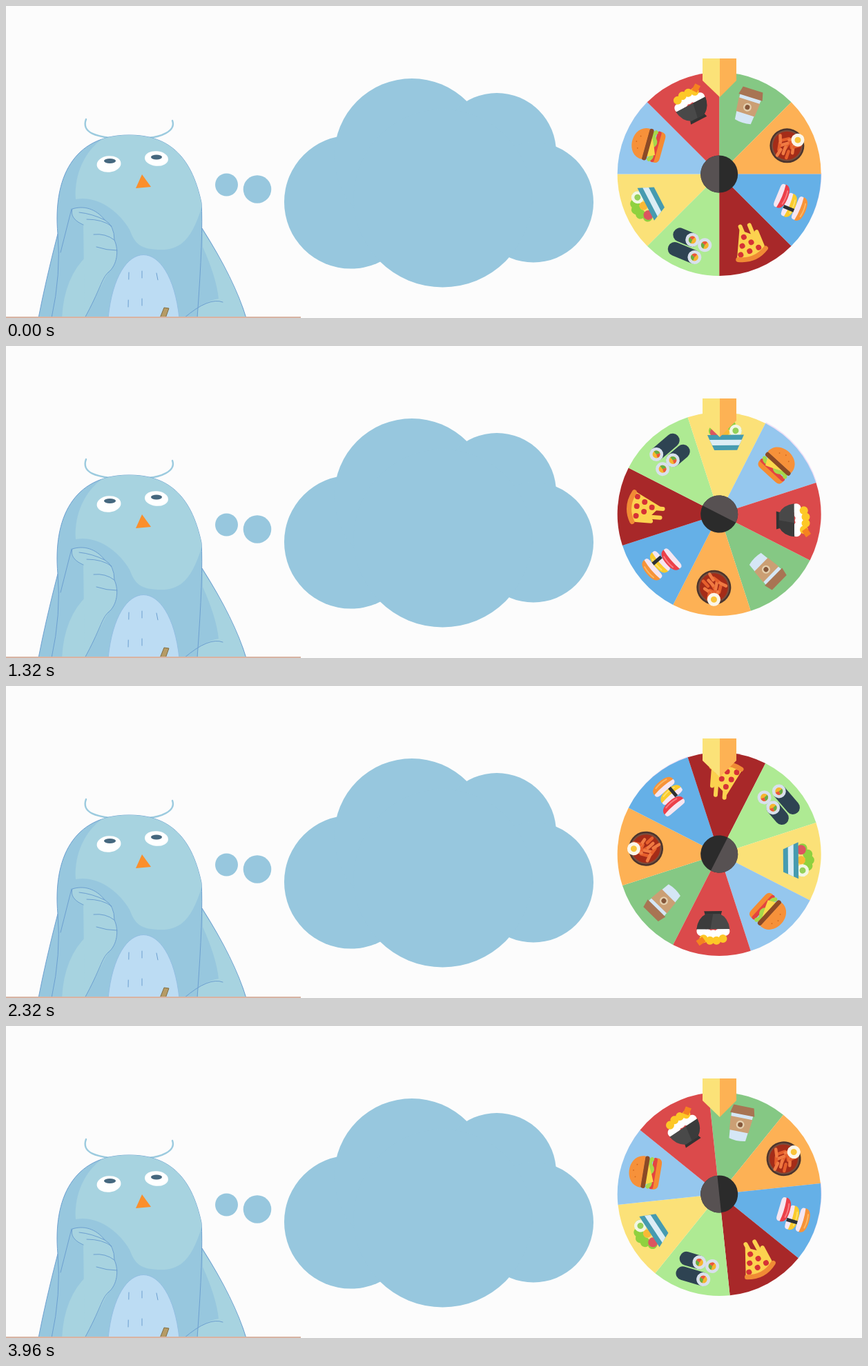
An HTML page for the animation above (4000 ms loop, 1240 px wide and 452 px high).

```html
<!DOCTYPE html>
<html lang="en">
<head>
<meta charset="utf-8">
<title>Lunch wheel</title>
<style>
html, body { margin: 0; width: 100%; height: 100%; overflow: hidden; background: #fcfcfc; }
svg { display: block; }
.line { fill: none; }
.edge, .line { stroke: #6c9fd0; stroke-linecap: round; }
.base { fill: #97c7de; }
.light { fill: #a7d3e0; }
</style>
</head>
<body>
<svg width="1240" height="452" viewBox="0 0 1240 452">
  <g id="bird">
    <path d="M116 164C108 185 136 189 150 191M241 166C247 182 222 190 206 191" fill="none" stroke="#9ccbdf" stroke-width="2.4" stroke-linecap="round"/>
    <path class="base edge" d="M47 452Q57 400 75 330L284 322Q331 396 348 452"/>
    <path class="light" d="M285 349Q305 394 308 424Q286 428 258 452H347Q331 396 285 326Z"/>
    <path class="base edge" id="body" d="M66 452Q80 388 75 330C68 250 97 187 178 187C233 187 268 214 283 285Q286 330 277 452"/>
    <clipPath id="inside"><use href="#body"/></clipPath>
    <path class="light" clip-path="url(#inside)" d="M149 187C113 205 98 248 101 280C133 274 164 298 179 324C187 345 195 353 225 353C255 353 270 335 284 290V187Z"/>
    <path d="M148 452C160 330 238 330 251 452" fill="#bcdcf3" stroke="#93bfe3"/>
    <path class="line" stroke-dasharray="10 30" d="M178 386L177 437M197 384V438M218 387L220 397"/>
    <path class="light" d="M112 317Q128 345 119 360Q84 392 81 452H114L148 386Z"/>
    <path class="light edge" d="M112 317C101 312 93 305 96 294C112 289 130 293 143 310Q157 318 157 339C164 354 161 376 148 386C139 394 136 412 114 452"/>
    <path class="line" d="M95 294L79 357M106 299Q125 301 143 310M117 309Q140 309 153 319M127 331Q144 329 157 339M131 349Q146 354 161 354M258 452Q294 421 314 429"/>
    <g fill="#fff">
      <ellipse cx="149" cy="229" rx="17.5" ry="11.7" transform="rotate(-6 149 229)"/>
      <ellipse cx="218" cy="221" rx="17" ry="10.8" transform="rotate(5 218 221)"/>
    </g>
    <g fill="#46687f">
      <ellipse cx="150.5" cy="224.5" rx="8.5" ry="3.4"/>
      <ellipse cx="218" cy="219" rx="8" ry="3.4"/>
    </g>
    <path d="M197 244L188 264L210 262Z" fill="#fb8f2c"/>
    <path d="M229 437L236 438L231 452H223Z" fill="#b59b66" stroke="#806c40"/>
  </g>
  <path d="M0 451H427" stroke="#d8b4a3" stroke-width="2"/>

  <g class="base">
    <circle cx="319.5" cy="259" r="16.5"/>
    <circle cx="364" cy="265.5" r="20.3"/>
    <circle cx="499.5" cy="284" r="96.5"/>
    <circle cx="588" cy="217.5" r="112.5"/>
    <circle cx="711" cy="212" r="86"/>
    <circle cx="764" cy="284.5" r="87"/>
    <circle cx="632.5" cy="278.5" r="129"/>
  </g>

  <g transform="translate(1034 242)"><g id="halo" class="spin"></g></g>
  <g transform="translate(1033.2 243.5)"><g id="wheel" class="spin"></g></g>
  <path d="M1009 76H1034V132L1009 108Z" fill="#fbe278"/>
  <path d="M1034 76H1058V108L1034 132Z" fill="#fdb254"/>
</svg>
<script>
const shape = (d, fill) => `<path d="${d}" fill="${fill}"/>`;
const dot = (x, y, r, fill) => `<circle cx="${x}" cy="${y}" r="${r}" fill="${fill}"/>`;
const stroke = (d, color, width) =>
  `<path d="${d}" fill="none" stroke="${color}" stroke-width="${width}" stroke-linecap="round"/>`;
const repeat = (n, draw) => Array.from({ length: n }, (_, i) => draw(i)).join('');
const heap = (n, width, y, rise, r, fill) => repeat(n, i => {
  const side = 2 * i / (n - 1) - 1;
  return dot(side * width, y - rise * (1 - side * side), r, fill);
});
const turn = (angle, content) => `<g transform="rotate(${angle})">${content}</g>`;
const move = (x, y, content) => `<g transform="translate(${x} ${y})">${content}</g>`;

// Every icon stands upright, with the rim of the wheel above it.
const coffee = turn(-5,
  shape('M-16 -9H16L12 29Q0 32 -12 29Z', '#d5e6f5') +
  shape('M-15 -20H15L18 -8H-18Z', '#a87453') +
  shape('M-16 -3H16L14 17H-14Z', '#cb9f74') +
  dot(0, 7, 6, '#e4cfae') + dot(0, 7, 3.5, '#85583b'));

const riceCakes = move(-0.5, 5.5,
  dot(0, 0, 25, '#4b352e') + dot(0, 0, 22.5, '#7a4d3c') + dot(0, 0, 20.5, '#a52c18') +
  repeat(12, i => {
    const angle = i * 2.4, r = 4.6 * Math.sqrt(i);
    return move(r * Math.cos(angle), r * Math.sin(angle),
      turn(55 + 45 * Math.sin(i * 2), stroke('M-5 0H5', i % 2 ? '#f07a42' : '#e65f2c', 4.5)));
  }) + dot(-1.5, -17.5, 9.5, '#fbf6ea') + dot(-1.5, -17.5, 4.5, '#f9c43a'));

const nigiri = (x, y, fish, shine) => move(x, y,
  shape('M-17 0H17Q20 8 12 8H-12Q-20 8 -17 0Z', '#f6e6f1') +
  shape('M-18 2Q-18 -8 0 -8T18 2Q0 -1 -18 2Z', fish) + stroke('M-10 -4Q0 -6 10 -4', shine, 2));
const sushi = nigiri(2, -16, '#f79339', '#fbb864') + nigiri(3, 0, '#fbcb2c', '#fde06b') +
  shape('M5 -8H10V8H5Z', '#2c3135') + nigiri(-5, 15, '#ec3f49', '#f77a80');

const pizza = shape('M-21 -12Q0 -22 23 -11L4 26L-14 10Z', '#fcd24f') +
  stroke('M1 10V30M-12 0V27M-18 -8V14', '#fcd24f', 6) +
  repeat(3, row => repeat(3 - row, i => dot(2 + 14 * (i - 1 + row / 2), 11 * row - 8, 4, '#d63236'))) +
  stroke('M-21 -13Q0 -25 22 -13', '#f08b35', 7);

const rollFace = (x, y) => move(x, y,
  dot(0, 0, 10, '#d8e0ec') + dot(0, 0, 5.5, '#f6b52f') +
  shape('M0 0V-5.5A5.5 5.5 0 0 1 5 2Z', '#66ad45') + shape('M0 0L5 2A5.5 5.5 0 0 1 -2 5Z', '#e9573f'));
const rolls = stroke('M-12 -13H18M0 9H19', '#2e4352', 20) +
  rollFace(-13, -13) + rollFace(-20, 9) + rollFace(-0.5, 9);

const salad = turn(-5,
  heap(5, 17, -9, 10, 7, '#8fd13f') + heap(2, 15, -7, 0, 7, '#dc5560') + dot(0, -7, 6, '#f8b936') +
  dot(15, -9, 9, '#f2f7e4') + dot(15, -9, 4.5, '#94d05a') +
  shape('M-26 -3H27L17 19H-16Z', '#469bb0') + shape('M-23 4H24L20 12H-19Z', '#dcedf4'));

const burger = turn(-7,
  shape('M-23 14H23Q23 22 15 22H-15Q-23 22 -23 14Z', '#f58b32') +
  stroke('M-20 12H20', '#e44440', 6) + stroke('M-20 7Q-15 12 -10 7T0 7T10 7T20 7', '#a6d84b', 6) +
  shape('M-18 2H15L-2 10L-12 14Z', '#fbd84c') + stroke('M-20 0H20', '#8b4a26', 7) +
  shape('M-23 -3C-23 -30 23 -30 23 -3Z', '#f6913a') + heap(3, 9, -13, 4, 0.9, '#d2671c'));

const riceBowl = turn(-5,
  shape('M-11 22H11L13 29H-13Z', '#333') + heap(5, 17, 0, 5, 7, '#fff') +
  heap(4, 14, -11, 3, 6, '#fdc827') + shape('M11 -15L20 -21L25 -14L16 -8Z', '#f58220') +
  shape('M-24 3H24Q22 19 10 25H-10Q-22 19 -24 3Z', '#494949') +
  shape('M4 3H24Q22 19 10 25H0Z', '#3b3b3b'));

const slices = [['#85c884', coffee], ['#fdb155', riceCakes], ['#65b0e7', sushi], ['#a82829', pizza],
  ['#aeea93', rolls], ['#fbe178', salad], ['#95c7ee', burger], ['#db4a4b', riceBowl]];
const radius = 147.5, half = radius * Math.SQRT1_2;
const wedge = (color, i) =>
  turn(i * 45, shape(`M0 0V${-radius}A${radius} ${radius} 0 0 1 ${half} ${-half}Z`, color));

wheel.innerHTML = slices.map(([color], i) => wedge(color, i)).join('') +
  slices.map(([, icon], i) => turn(i * 45 + 22.5, move(0, -112, icon))).join('') +
  dot(0, 0, 27, '#2b2b2b') + shape('M0 -27A27 27 0 0 0 0 27Z', '#575152');
halo.innerHTML = wedge('#efdff7', 2) + wedge('#efdff7', 6);

const spinning = document.querySelectorAll('.spin');
// 3 degree steps at 30 per second, shown at 25 pictures per second.
function draw() {
  const picture = Math.floor(performance.now() % 4000 / 40);
  const angle = 3 * Math.floor(picture * 6 / 5);
  spinning.forEach(g => g.setAttribute('transform', `rotate(${angle})`));
  requestAnimationFrame(draw);
}
draw();
</script>
</body>
</html>
```
